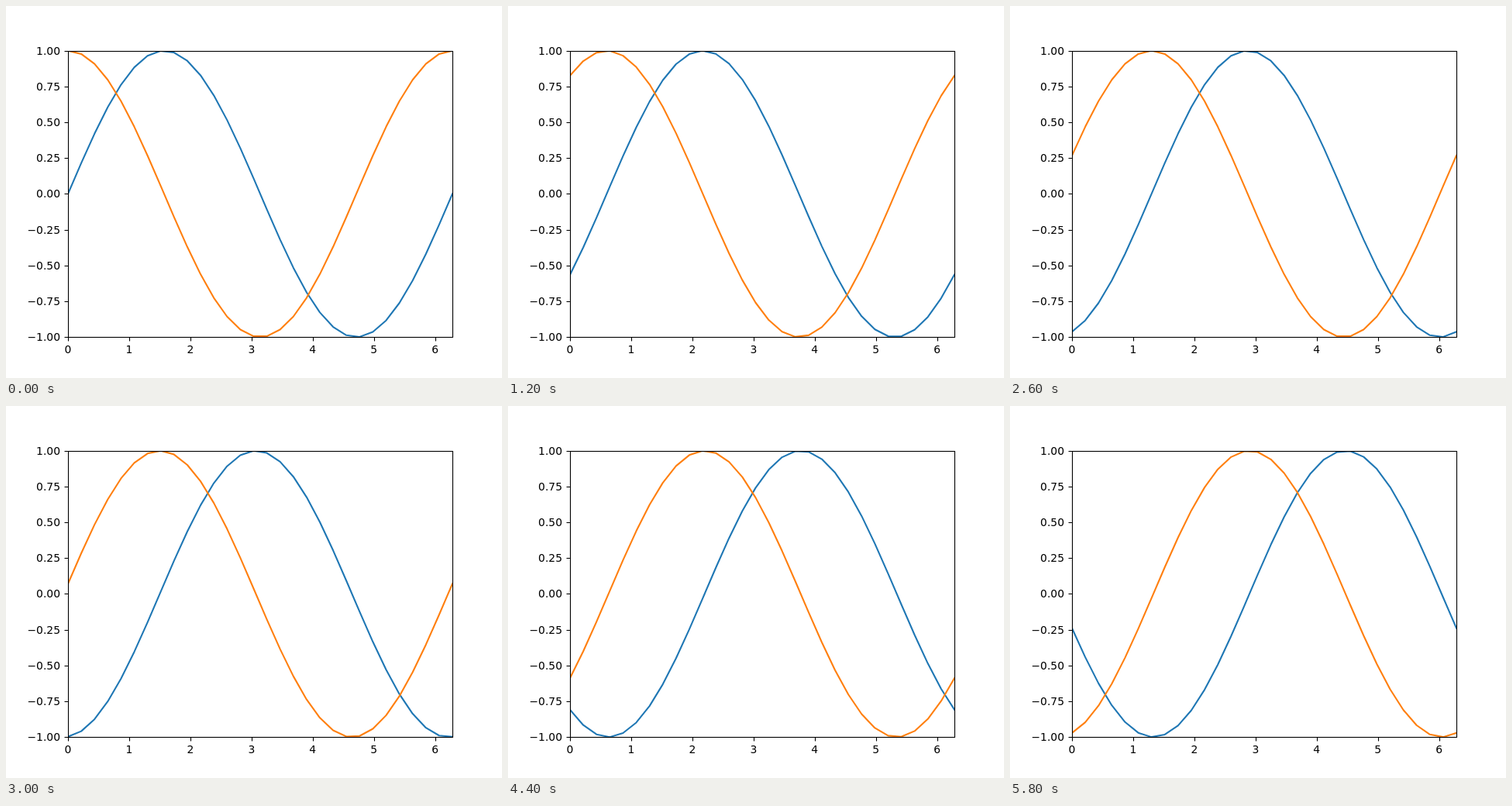
An HTML page for the animation above (6000 ms loop, 640 by 480 pixels).

```html
<!DOCTYPE html>
<html lang="en">
<head>
<meta charset="utf-8">
<title>Travelling sine and cosine</title>
<style>
  html, body { margin: 0; width: 100%; height: 100%; overflow: hidden; background: #fff; }
  svg { display: block; }
  text { font: 13.889px "DejaVu Sans", sans-serif; fill: #000; }
  .wave { fill: none; stroke-width: 2.083; stroke-linejoin: round; stroke-linecap: square; }
  .axis { fill: none; stroke: #000; stroke-width: 1.11; }
</style>
</head>
<body>
<svg width="640" height="480" viewBox="0 0 640 480">
  <clipPath id="plot"><rect x="80" y="58" width="496" height="369"/></clipPath>
  <g id="ticks"></g>
  <g clip-path="url(#plot)">
    <polyline id="sine" class="wave" stroke="#1f77b4"/>
    <polyline id="cosine" class="wave" stroke="#ff7f0e"/>
  </g>
  <rect class="axis" x="80.5" y="58.5" width="496" height="369"/>
</svg>
<script>
  const LEFT = 80, WIDTH = 496, MIDDLE = 242.4, AMPLITUDE = 184.8;
  const POINTS = 30, STEPS = 30, STEP_MS = 200, PHASE_STEP = 0.1;
  const TURN = 2 * Math.PI;

  const byId = id => document.getElementById(id);
  const toX = v => LEFT + v / TURN * WIDTH;
  const toY = v => MIDDLE - v * AMPLITUDE;
  const snap = v => Math.round(v) + 0.5;

  function add(tag, attrs, content = "") {
    const el = document.createElementNS("http://www.w3.org/2000/svg", tag);
    for (const key in attrs) el.setAttribute(key, attrs[key]);
    el.textContent = content;
    byId("ticks").append(el);
  }

  function drawTicks() {
    for (let v = 0; v <= 6; v++) {
      add("path", { class: "axis", d: `M${snap(toX(v))} 427.5v5` });
      add("text", { x: toX(v), y: 448, "text-anchor": "middle" }, v);
    }
    for (let v = -1; v <= 1; v += 0.25) {
      const label = v.toFixed(2).replace("-", "\u2212");
      add("path", { class: "axis", d: `M75.5 ${snap(toY(v))}h5` });
      add("text", { x: 70, y: Math.round(toY(v) + 5), "text-anchor": "end" }, label);
    }
  }

  function drawWave(id, fn, phase) {
    const points = Array.from({ length: POINTS }, (_, i) => {
      const x = i / (POINTS - 1) * TURN;
      return `${toX(x).toFixed(3)},${toY(fn(x - phase)).toFixed(3)}`;
    });
    byId(id).setAttribute("points", points.join(" "));
  }

  const start = performance.now();
  let shown = -1;

  function render() {
    const step = Math.floor((performance.now() - start) / STEP_MS) % STEPS;
    if (step !== shown) {
      shown = step;
      drawWave("sine", Math.sin, step * PHASE_STEP);
      drawWave("cosine", Math.cos, step * PHASE_STEP);
    }
    requestAnimationFrame(render);
  }

  drawTicks();
  render();
</script>
</body>
</html>
```
